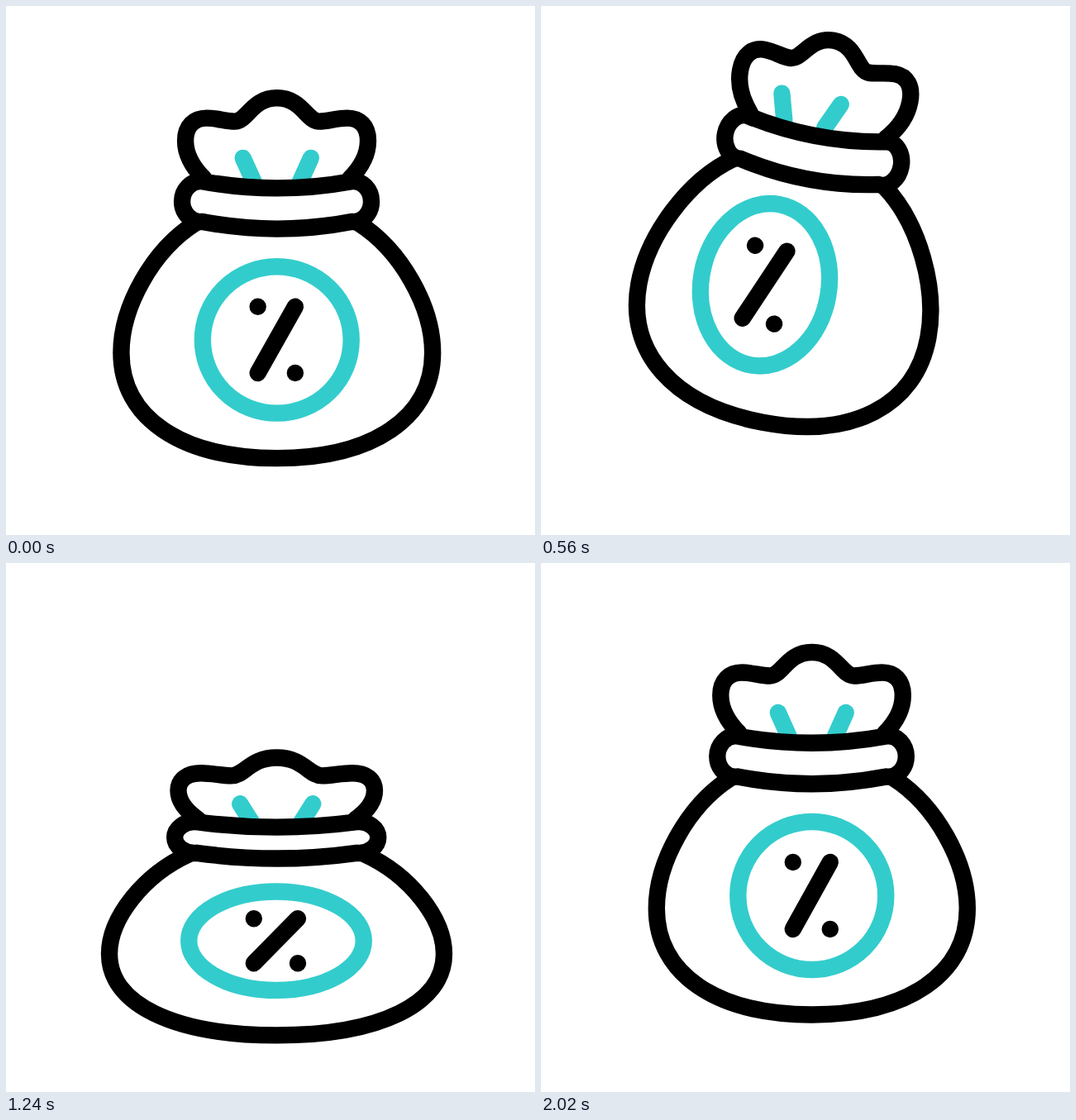
An HTML page that plays this animation: 640x640 px, repeating every 2040 ms.

```html
<!DOCTYPE html>
<html lang="en">
<head>
<meta charset="utf-8">
<title>Money bag</title>
<style>
  html, body { margin: 0; width: 100%; height: 100%; overflow: hidden; background: #fff; }
  svg { display: block; width: 100vw; height: 100vh; }
  path, circle {
    fill: none; stroke: #000; stroke-width: 20.4;
    stroke-linecap: round; stroke-linejoin: round;
    vector-effect: non-scaling-stroke;
  }
  .teal { stroke: #33cccc; }
</style>
</head>
<body>
<svg viewBox="0 0 640 640">
  <g id="folds">
    <path class="teal" d="M287 181L300 210M369 181L356 210"/>
  </g>
  <g id="bag">
    <path d="M240 206C226 192 217.5 176 217.5 160C217.5 142 228 132.5 243 132.5
      C256 132.5 266 136.5 277 136.5C292 136.5 298 108 328 108
      C358 108 364 136.5 379 136.5C390 136.5 400 132.5 413 132.5
      C428 132.5 438 142 438 160C438 176 430 192 416 206"/>
    <path d="M238 209.5Q328 226 418 209.5C431 207.5 442 220 442 234
      C442 248 431 260.5 418 258.5Q328 276 238 258.5
      C225 260.5 213.5 248 213.5 234C213.5 220 225 207.5 238 209.5Z"/>
    <path d="M230 260C178 293 140 362 140 418C140 497 212 546.5 328 546.5
      C444 546.5 516 497 516 418C516 362 478 293 426 260"/>
  </g>
  <g id="coin">
    <circle class="teal" cx="328" cy="402.5" r="89.5"/>
    <path d="M350 362L305 443M305 362h.01M350 443h.01"/>
  </g>
</svg>
<script>
const LOOP = 2040, PEAK = 580, LAND = 1240, SETTLED = 1575;

// Matrix a b c d and centre x y at rest, and what a full jump or squash adds
const REST = [1, 0, 0, 1, 327.8, 402.5];
const BAG = {
  jump: [-.07, .174, -.196, .056, -31.3, -51.1],
  squash: [.077, 0, 0, -.234, -.3, 58.6]
};
const COIN = {
  jump: [-.15, .153, -.19, .09, -56.8, -65.8],
  squash: [.182, 0, 0, -.333, -.8, 54.7]
};

const smooth = u => u * u * (3 - 2 * u);
const quartInOut = u => u < .5 ? 8 * u ** 4 : 1 - 8 * (1 - u) ** 4;

// How far the jump and the squash have gone, 0 to 1
function weights(t) {
  if (t < PEAK) {
    const u = t / PEAK;
    return [quartInOut(u), .2 * Math.sin(Math.PI * Math.sqrt(u))];
  }
  if (t < LAND) {
    const u = (t - PEAK) / (LAND - PEAK);
    return [1 - u ** 2.6, u ** 2.2];
  }
  const u = Math.min(1, (t - LAND) / (SETTLED - LAND));
  return [0, 1 - smooth(u)];
}

const blend = (part, [jump, squash]) =>
  REST.map((r, i) => r + jump * part.jump[i] + squash * part.squash[i]);

function place(id, [a, b, c, d, x, y]) {
  document.getElementById(id).setAttribute("transform",
    `translate(${x} ${y}) matrix(${a} ${b} ${c} ${d} 0 0) translate(-328 -402.5)`);
}

function draw() {
  const w = weights(performance.now() % LOOP);
  const bag = blend(BAG, w), coin = blend(COIN, w);
  const [a, b, c, d, x, y] = bag;
  const turn = coin[4] - x;
  const squeeze = 1 + turn * .0025;
  place("bag", bag);
  place("coin", coin);
  // The folds narrow and lean as the coin turns aside
  place("folds", [a * squeeze, b * squeeze, c + turn * .0036, d, x + turn * 1.3, y + turn * .25]);
  requestAnimationFrame(draw);
}
draw();
</script>
</body>
</html>
```
